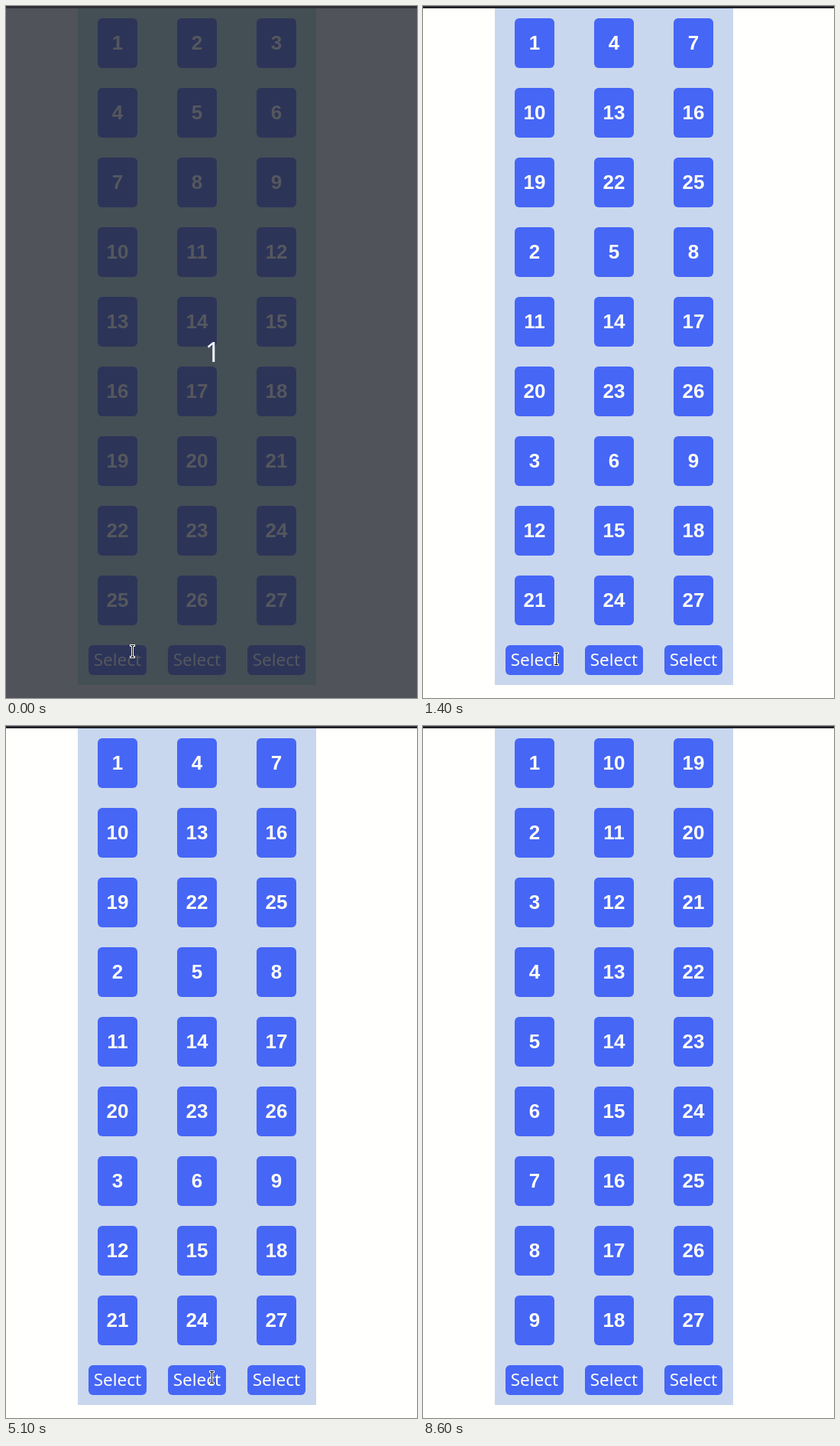
Write an HTML page with a canvas that moves like this. It is 538 px wide and 904 px high and loops after 9.8 s.

```html
<!DOCTYPE html>
<html lang="en">
<head>
<meta charset="utf-8">
<title>Card columns</title>
<style>
  html, body { margin: 0; width: 100%; height: 100%; overflow: hidden; background: #fffffd; }
  canvas { display: block; }
</style>
</head>
<body>
<canvas id="stage" width="538" height="904"></canvas>
<script>
const ctx = document.getElementById('stage').getContext('2d');
const LOOP = 9800;

const LIGHT = { page: '#fffffd', panel: '#c9d7ee', card: '#4666f6', text: '#fffefa', edge: '#0c0a0c' };
const DIM = { page: '#50535a', panel: '#444e55', card: '#2c3558', text: '#55575d', edge: '#2b2d36' };

// Card value for row r, column c in each successive deal.
const deals = [
  (r, c) => 3 * r + c + 1,
  (r, c) => 3 * ((3 * r + c) % 9) + Math.floor(r / 3) + 1,
  (r, c) => 9 * c + r + 1
];

// Pointer stops: start time, shape, x, y.
const stops = [
  [0, 'beam', 166, 843],
  [700, 'beam', 174, 855],
  [800, 'beam', 175, 853],
  [4200, 'arrow', 206, 851],
  [4300, 'beam', 236, 855],
  [4400, 'beam', 258, 849],
  [4500, 'beam', 270, 844],
  [4800, 'beam', 278, 849],
  [5100, 'beam', 270, 851],
  [7900, 'beam', 264, 847],
  [8000, 'arrow', 241, 800],
  [8200, 'arrow', 206, 680],
  [8300, 'arrow', 140, 450],
  [8400, 'arrow', 64, 200],
  [8500, 'arrow', 2, 35],
  [8600, 'none', 0, 0]
];

function rect(x, y, w, h, color) {
  ctx.fillStyle = color;
  ctx.fillRect(x, y, w, h);
}

function box(x, y, w, h, color) {
  ctx.fillStyle = color;
  ctx.beginPath();
  ctx.roundRect(x, y, w, h, 6);
  ctx.fill();
}

function label(text, x, y, font, color, align = 'center') {
  ctx.font = font;
  ctx.textAlign = align;
  ctx.fillStyle = color;
  ctx.fillText(text, x, y);
}

const shapes = {
  none() {},
  beam(x, y) {
    rect(x - 4, y - 9, 7, 3, '#fff');
    rect(x - 4, y + 6, 7, 3, '#fff');
    rect(x - 2, y - 7, 3, 14, '#fff');
    rect(x - 3, y - 8, 5, 1, '#000');
    rect(x - 3, y + 7, 5, 1, '#000');
    rect(x - 1, y - 8, 1, 16, '#000');
  },
  arrow(x, y) {
    const outline = [[0, 0], [0, 17], [4, 13.5], [7, 20], [10, 18.5], [7, 12], [12, 12]];
    ctx.beginPath();
    for (const [dx, dy] of outline) ctx.lineTo(x + dx + .5, y + dy + .5);
    ctx.closePath();
    ctx.fillStyle = '#111';
    ctx.fill();
    ctx.strokeStyle = '#fff';
    ctx.lineWidth = 1;
    ctx.stroke();
  }
};

function draw(t) {
  const dim = t < 400;
  const theme = dim ? DIM : LIGHT;
  const deal = deals[t < 1400 ? 0 : t < 6200 ? 1 : 2];

  rect(0, 0, 538, 904, theme.page);
  rect(94, 3, 312, 884, theme.panel);
  rect(0, 0, 538, 2, '#302f35');
  rect(0, 2, 538, 1, theme.edge);

  for (let c = 0; c < 3; c++) {
    const mid = 146 + 104 * c;
    for (let r = 0; r < 9; r++) {
      const y = 16 + 91 * r;
      box(mid - 26, y, 52, 65, theme.card);
      label(deal(r, c), mid, y + 41, 'bold 26px "Liberation Sans", Arial, sans-serif', theme.text);
    }
    box(mid - 38, 835, 76, 39, theme.card);
    label('Select', mid, 862, '500 22.5px "Noto Sans", sans-serif', theme.text);
  }

  if (dim) label('1', 260.5, 465, '36px "Noto Sans", sans-serif', '#eef1ff', 'left');

  const [, shape, x, y] = stops.findLast(s => s[0] <= t);
  shapes[shape](x, y);
}

const start = performance.now();
function tick() {
  draw((performance.now() - start) % LOOP);
  requestAnimationFrame(tick);
}
tick();
</script>
</body>
</html>
```
